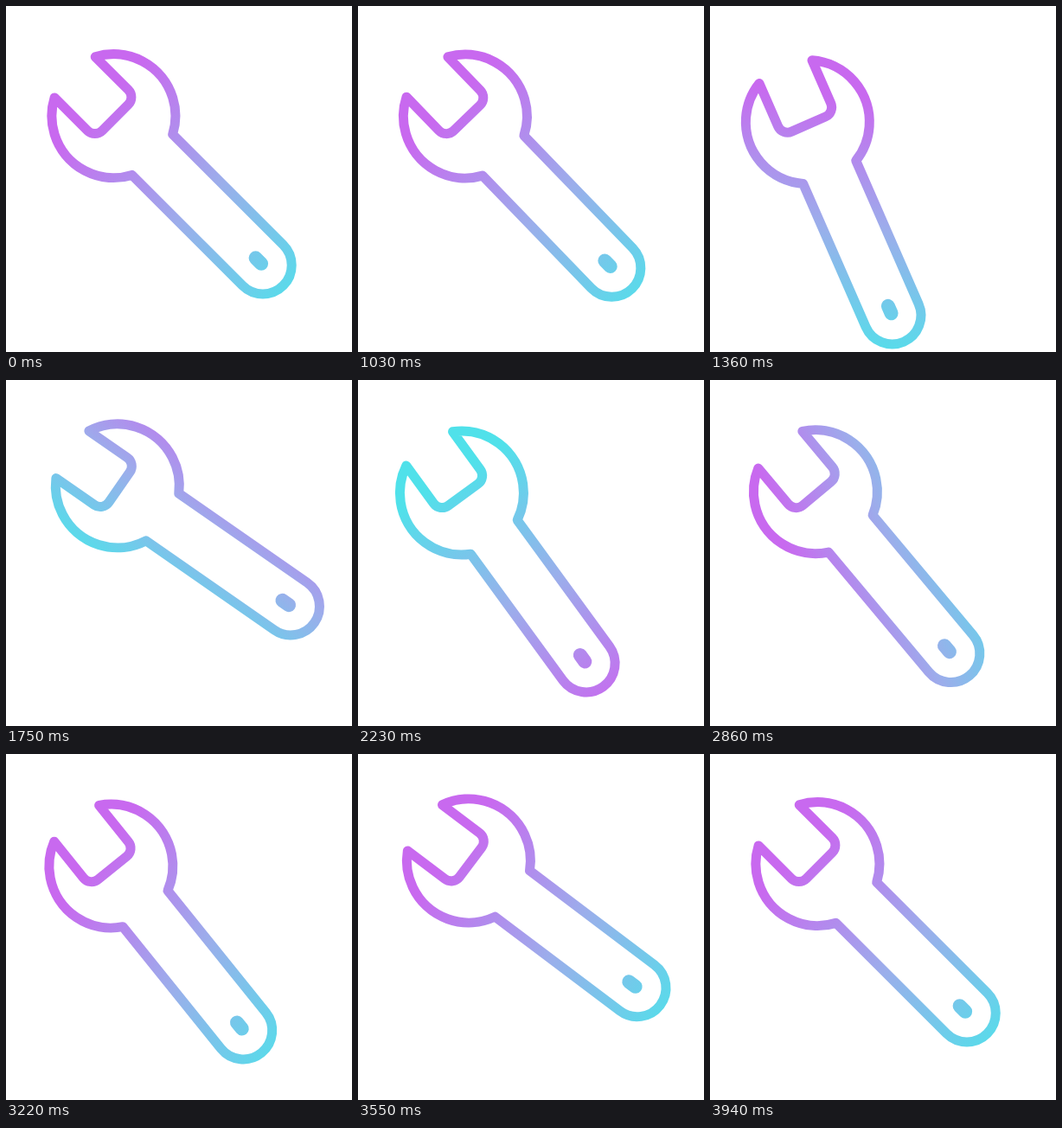
An HTML page with a canvas for the animation above (3.97 s loop, 400 px wide and 400 px high).

```html
<!DOCTYPE html>
<html lang="en">
<head>
<meta charset="utf-8">
<title>Wrench</title>
<style>
  html, body { margin: 0; width: 100%; height: 100%; overflow: hidden; background: #fff; }
  canvas { display: block; width: 400px; height: 400px; }
</style>
</head>
<body>
<canvas id="stage" width="400" height="400"></canvas>
<script>
const canvas = document.getElementById('stage');
const ctx = canvas.getContext('2d');
const dpr = window.devicePixelRatio || 1;
canvas.width = canvas.height = 400 * dpr;

const LOOP = 3970, REST = 1030, STEP = 30;
const PIVOT = 100;
const HEAD = { x: 124.4, y: 127.1, r: 71.5 };
const HALF = 33.3;          // half width of handle and jaw
const CAP = 244;            // handle end, measured along the axis
const JAW = 2.7;            // depth of the jaw
const GLOW = { x: 143, y: -15 }; // gradient centre
const RAD = Math.PI / 180;

// [step, degrees]
const SWING = [
  [0, 0], [8, 22.5], [11, 22.5], [20, -10.2], [25, -10.2], [34, 22.5],
  [37, 22.5], [46, -10.2], [57.7, -10.2], [66.7, 22.5], [69.7, 22.5],
  [78.3, -10.2], [79.2, -10.2], [98.4, 0]
];
const TURN = [[0, 0], [25, 92], [41, 184], [62, 290], [74, 346], [84, 360]];

function segment(keys, n) {
  let i = 0;
  while (i < keys.length - 2 && n >= keys[i + 1][0]) i++;
  const [t0, t1] = [keys[i][0], keys[i + 1][0]];
  return { i, span: t1 - t0, u: Math.min(1, Math.max(0, (n - t0) / (t1 - t0))) };
}

function eased(keys, n) {
  const { i, u } = segment(keys, n);
  const a = keys[i][1], b = keys[i + 1][1];
  return a + (b - a) * u * u * (3 - 2 * u);
}

function slope(keys, i) {
  if (i === 0 || i === keys.length - 1) return 0;
  const a = keys[i - 1], b = keys[i + 1];
  return (b[1] - a[1]) / (b[0] - a[0]);
}

function spline(keys, n) {
  const { i, u, span } = segment(keys, n);
  const v = 1 - u;
  return keys[i][1] * (1 + 2 * u) * v * v + keys[i + 1][1] * u * u * (3 - 2 * u)
    + span * u * v * (slope(keys, i) * v - slope(keys, i + 1) * u);
}

function gradient(angle) {
  const c = Math.cos(angle), s = Math.sin(angle);
  const len = 165 - 53 * s * s;
  const dx = len * c, dy = len * s;
  const g = ctx.createLinearGradient(GLOW.x - dx, GLOW.y - dy, GLOW.x + dx, GLOW.y + dy);
  g.addColorStop(0, '#c869ef');
  g.addColorStop(0.5, '#9baeeb');
  g.addColorStop(1, '#50e1ea');
  return g;
}

function outline() {
  const a = Math.asin(HALF / HEAD.r);
  const tip = -HEAD.r * Math.cos(a);
  ctx.beginPath();
  ctx.arc(0, 0, HEAD.r, a - Math.PI, -a);
  ctx.lineTo(CAP, -HALF);
  ctx.arc(CAP, 0, HALF, -Math.PI / 2, Math.PI / 2);
  ctx.arc(0, 0, HEAD.r, a, Math.PI - a);
  ctx.arcTo(JAW, HALF, JAW, -HALF, 12);
  ctx.arcTo(JAW, -HALF, tip, -HALF, 12);
  ctx.closePath();
}

function draw(n) {
  ctx.setTransform(dpr, 0, 0, dpr, 0, 0);
  ctx.fillStyle = '#fff';
  ctx.fillRect(0, 0, 400, 400);
  ctx.translate(PIVOT, PIVOT);
  ctx.rotate(eased(SWING, n) * RAD);
  ctx.translate(HEAD.x - PIVOT, HEAD.y - PIVOT);
  ctx.rotate(Math.PI / 4);

  ctx.strokeStyle = gradient(spline(TURN, n) * RAD);
  ctx.lineJoin = ctx.lineCap = 'round';
  ctx.lineWidth = 11;
  outline();
  ctx.stroke();

  ctx.lineWidth = 16;
  ctx.beginPath();
  ctx.moveTo(232.2, 0);
  ctx.lineTo(241.4, 0);
  ctx.stroke();
}

const start = performance.now();
function tick() {
  const t = (performance.now() - start) % LOOP;
  draw(t < REST ? 0 : Math.floor((t - REST) / STEP) + 1);
  requestAnimationFrame(tick);
}
tick();
</script>
</body>
</html>
```
